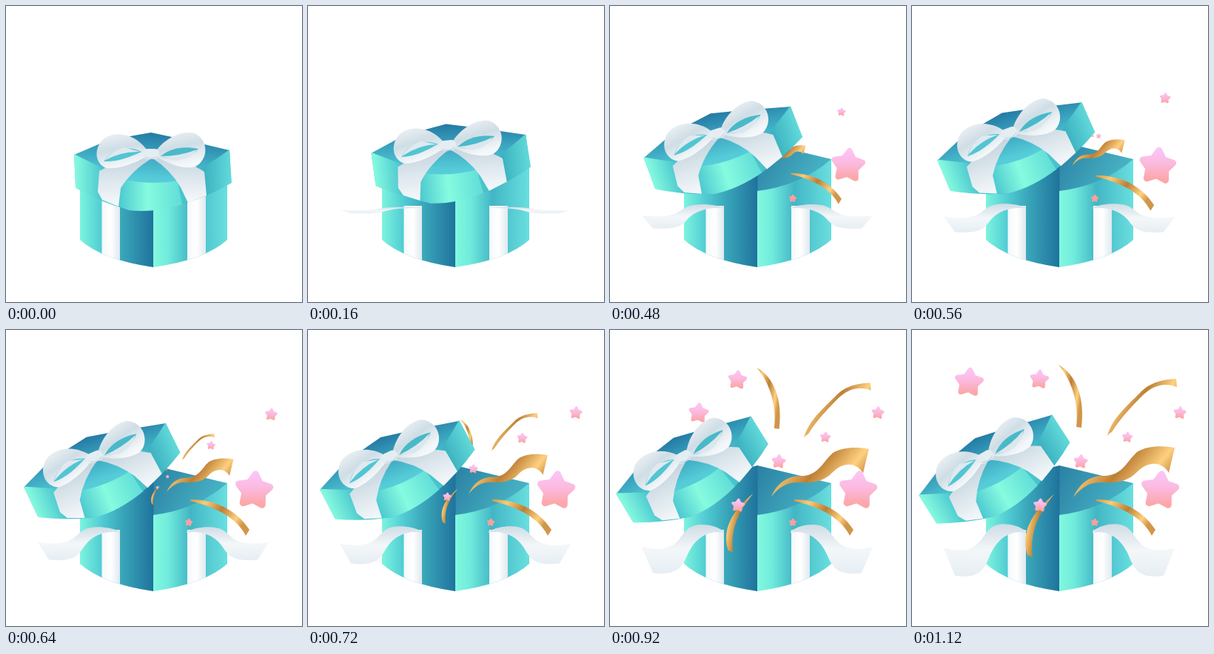
Write an HTML page that moves like this. It is 400 by 400 pixels and loops after 2.5 s.

```html
<!DOCTYPE html>
<html lang="en">
<head>
<meta charset="utf-8">
<title>Gift box</title>
<style>
  html, body { margin: 0; width: 100%; height: 100%; overflow: hidden; background: #fff; }
  svg { display: block; width: 100vw; height: 100vh; }
</style>
</head>
<body>
<svg viewBox="0 0 400 400">
  <defs>
    <linearGradient id="boxLeft">
      <stop offset="0" stop-color="#7cf4de"/><stop offset=".3" stop-color="#50cbd3"/>
      <stop offset=".58" stop-color="#39a5b9"/><stop offset="1" stop-color="#1f729c"/>
    </linearGradient>
    <linearGradient id="boxRight">
      <stop offset="0" stop-color="#82f8de"/><stop offset=".2" stop-color="#70ebdc"/>
      <stop offset=".5" stop-color="#42b6c5"/><stop offset="1" stop-color="#6adfdf"/>
    </linearGradient>
    <linearGradient id="wallRight" x2="1" y2=".4">
      <stop offset="0" stop-color="#2a80a3"/><stop offset="1" stop-color="#49b5c6"/>
    </linearGradient>
    <linearGradient id="lidTop" x1=".55" y1="0" x2=".4" y2="1">
      <stop offset="0" stop-color="#2378a4"/><stop offset=".3" stop-color="#3ba5bf"/>
      <stop offset=".6" stop-color="#55cbd8"/><stop offset="1" stop-color="#62d9de"/>
    </linearGradient>
    <linearGradient id="lidLeft">
      <stop offset="0" stop-color="#88fbdf"/><stop offset=".5" stop-color="#49c6cf"/>
      <stop offset="1" stop-color="#3fb6c6"/>
    </linearGradient>
    <linearGradient id="lidFront">
      <stop offset="0" stop-color="#4cc8d0"/><stop offset=".45" stop-color="#86fbdf"/>
      <stop offset="1" stop-color="#5fdcd7"/>
    </linearGradient>
    <linearGradient id="lidRight">
      <stop offset="0" stop-color="#4bc8cf"/><stop offset=".5" stop-color="#3cb3c1"/>
      <stop offset="1" stop-color="#63dada"/>
    </linearGradient>
    <linearGradient id="silk">
      <stop offset="0" stop-color="#f4f8fa"/><stop offset=".5" stop-color="#fff"/>
      <stop offset="1" stop-color="#dfe9ef"/>
    </linearGradient>
    <linearGradient id="band" x2="0" y2="1">
      <stop offset="0" stop-color="#c3d2dc"/><stop offset=".5" stop-color="#dde7ed"/>
      <stop offset="1" stop-color="#f6f9fb"/>
    </linearGradient>
    <linearGradient id="tailShade" x2="0" y2="1">
      <stop offset="0" stop-color="#cfdce5"/><stop offset=".5" stop-color="#f3f7f9"/>
      <stop offset="1" stop-color="#e6eef3"/>
    </linearGradient>
    <linearGradient id="loop" x2=".3" y2="1">
      <stop offset="0" stop-color="#eef3f6"/><stop offset=".5" stop-color="#cfdde5"/>
      <stop offset="1" stop-color="#f5f8fa"/>
    </linearGradient>
    <linearGradient id="gold" x2="1" y2=".4">
      <stop offset="0" stop-color="#d39a45"/><stop offset=".25" stop-color="#fbcb78"/>
      <stop offset=".55" stop-color="#bd7f35"/><stop offset=".85" stop-color="#ffd080"/>
      <stop offset="1" stop-color="#d0964a"/>
    </linearGradient>
    <linearGradient id="pink" x2="0" y2="1">
      <stop offset="0" stop-color="#fcc4f3"/><stop offset=".4" stop-color="#fbbbe2"/>
      <stop offset="1" stop-color="#fca6a8"/>
    </linearGradient>
    <clipPath id="bodyClip"><path d="M100 180V316Q130 343 199 353Q269 343 299 316V180Z"/></clipPath>
    <path id="tailShape" d="M154 270C140 259 116 257 106 266C90 280 92 303 43 293L58 330C98 336 99 314 108 297C118 278 134 268 154 272Z" fill="url(#tailShade)"/>
  </defs>

  <path d="M199 183L299 207V240L199 252Z" fill="url(#wallRight)"/>
  <g clip-path="url(#bodyClip)">
    <path d="M199.500 183L100 207V356H199.500Z" fill="url(#boxLeft)"/>
    <path d="M299 207Q257 243 199 250V356H299Z" fill="url(#boxRight)"/>
    <rect class="strip" x="129.500" width="24.500" height="90" fill="url(#silk)"/>
    <rect class="strip" x="245" width="25" height="90" fill="url(#silk)"/>
  </g>
  <g id="tails">
    <use href="#tailShape"/>
    <use href="#tailShape" transform="matrix(-1 0 0 1 398 0)"/>
  </g>

  <g id="confetti"></g>

  <g id="lid">
    <path d="M92 201L139 181L196 171L243 181L302 195L304 238L236 266L166 272L94 244Z" fill="url(#lidTop)"/>
    <path d="M92 200L170 239L167 276Q130 266 94 246Z" fill="url(#lidLeft)"/>
    <path d="M154 233Q192 243 233 236L239 268Q200 280 166 276L152 271Z" fill="url(#lidFront)"/>
    <path d="M232 237Q268 219 302 194L305 239Q272 258 238 268Z" fill="url(#lidRight)"/>
    <path d="M184 201Q150 210 126 223L124 251L130 262L152 271L155 246Q170 222 197 206Z" fill="url(#band)"/>
    <path d="M197 205Q222 221 236 245L246 266L271 256L268 224Q245 209 208 200Z" fill="url(#band)"/>
    <path d="M190 194C174 172 148 169 134 178C118 190 119 212 135 219C152 221 176 212 190 203Z" fill="url(#loop)"/>
    <path d="M183 197C165 188 143 193 132 210C150 211 168 204 183 197Z" fill="#52c5d3"/>
    <path d="M181 197Q156 196 133 209Q142 196 160 191Z" fill="#dfe9ef"/>
    <path d="M203 195C218 176 240 168 255 172C275 182 273 208 256 217C240 222 216 212 203 203Z" fill="url(#loop)"/>
    <path d="M209 203C222 192 240 189 260 193C247 207 228 211 209 203Z" fill="#49b9ca"/>
    <path d="M209 203Q235 203 258 194Q247 208 228 209Z" fill="#dbe7ed"/>
    <rect x="185" y="193" width="22" height="14" rx="6" fill="#e4edf2"/>
    <path d="M188 204Q197 209 205 203" fill="none" stroke="#bccfdb"/>
  </g>
</svg>
<script>
  const LOOP = 2500, STEP = 40, END = 1120;
  const BURST = { x: 215, y: 205 };
  const byId = id => document.getElementById(id);
  const strips = document.querySelectorAll('.strip');

  const lerp = (a, b, p) => a + (b - a) * p;
  const progress = (t, from, to) => Math.min(1, Math.max(0, (t - from) / (to - from)));
  const quadOut = u => 1 - (1 - u) ** 2;
  const sineOut = u => Math.sin(u * Math.PI / 2);
  const sineInOut = u => sineOut(u) ** 2;

  function starPath() {
    const points = Array.from({ length: 10 }, (_, i) => {
      const r = i % 2 ? 0.46 : 0.82, a = i * Math.PI / 5 - 1.47;
      return `${(r * Math.cos(a)).toFixed(3)} ${(r * Math.sin(a)).toFixed(3)}`;
    });
    return `M${points.join('L')}Z`;
  }

  function addPath(d, paint) {
    const el = document.createElementNS('http://www.w3.org/2000/svg', 'path');
    el.setAttribute('d', d);
    el.setAttribute('fill', paint);
    byId('confetti').append(el);
    return el;
  }

  // Every piece leaves the burst point at `from` and reaches (x, y) in full size at `to`.
  function ribbon(from, to, x, y, d) {
    return { el: addPath(d, 'url(#gold)'), from, to, x, y, size: 1, origin: `${-x} ${-y}` };
  }

  function star(from, to, x, y, size, paint = 'url(#pink)') {
    const el = addPath(starPath(), paint);
    el.setAttribute('stroke', paint);
    el.setAttribute('stroke-width', 0.34);
    el.setAttribute('stroke-linejoin', 'round');
    return { el, from, to, x, y, size, origin: '0 0' };
  }

  const pieces = [
    ribbon(280, 600, 249, 229, 'M249 229C275 229 308 238 329 270L324 278C312 254 285 240 249 231Z'),
    ribbon(340, 1060, 218, 226, 'M218 226C228 203 245 196 262 197C285 195 290 178 304 165C318 156 338 156 355 159L347 193C338 178 320 176 304 192C290 207 270 207 252 206C238 207 228 214 218 226Z'),
    ribbon(500, 1020, 264, 143, 'M264 143C270 120 290 103 308 85C322 70 340 67 357 66L358 77C340 70 325 76 312 88C292 108 280 122 270 138Q267 139 264 143Z'),
    ribbon(600, 980, 225, 132, 'M198 47C222 60 234 92 229 132L222 131C226 100 216 68 198 47Z'),
    ribbon(560, 1040, 192, 222, 'M192 222C160 248 147 275 156 304L163 307C160 280 165 255 192 222Z'),
    star(160, 640, 335, 217, 27),
    star(320, 700, 362, 112, 9),
    star(480, 760, 291, 145, 7.5),
    star(160, 480, 247, 260, 5.5, '#f9a09f'),
    star(600, 900, 228, 178, 10),
    star(600, 900, 173, 237, 9.5),
    star(640, 940, 172, 67, 13.5),
    star(760, END, 77, 71, 20.5)
  ];

  function draw(t) {
    const x = lerp(196, 99, sineInOut(progress(t, 0, 920)));
    const y = lerp(199, 170.5, sineOut(progress(t, 0, 600)));
    const angle = -29.5 * sineOut(progress(t, 40, END));
    byId('lid').setAttribute('transform', `translate(${x} ${y}) rotate(${angle}) translate(-196 -199)`);

    const drop = lerp(0.08, 1, progress(t, 120, 980));
    byId('tails').setAttribute('transform', `translate(0 273) scale(1 ${drop}) translate(0 -271)`);
    byId('tails').style.display = t ? '' : 'none';
    strips.forEach(el => el.setAttribute('y', t ? 270 : 256));

    for (const piece of pieces) {
      const p = quadOut(progress(t, piece.from, piece.to));
      piece.el.style.display = p ? '' : 'none';
      const px = lerp(BURST.x, piece.x, p), py = lerp(BURST.y, piece.y, p);
      piece.el.setAttribute('transform',
        `translate(${px} ${py}) scale(${piece.size * p}) translate(${piece.origin})`);
    }
  }

  const start = performance.now();
  function tick() {
    const t = (performance.now() - start) % LOOP;
    draw(Math.min(END, Math.floor(t / STEP) * STEP));
    requestAnimationFrame(tick);
  }
  tick();
</script>
</body>
</html>
```
